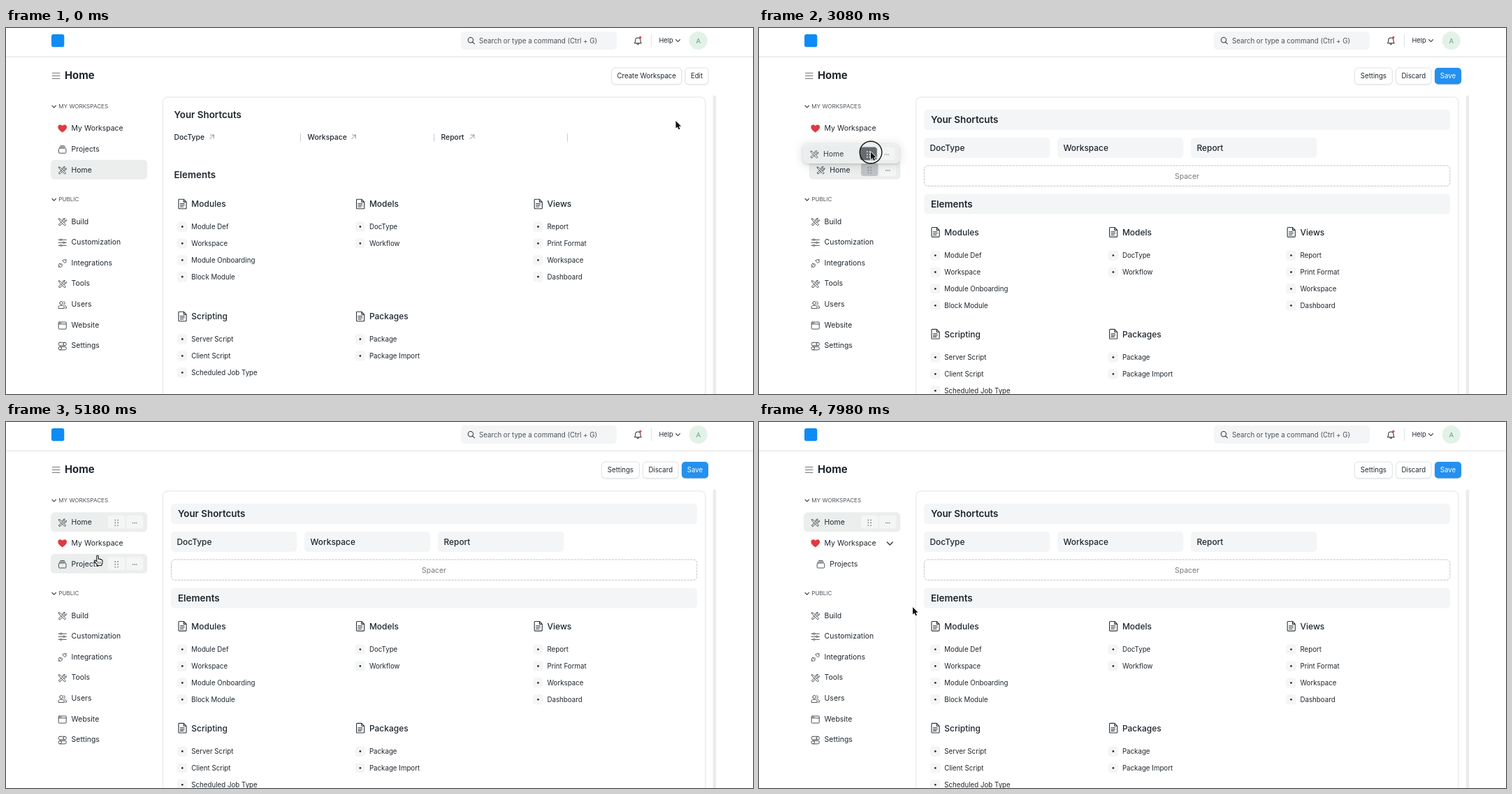
Recreate the animation shown at these times as an HTML page with a canvas. Size 1069 px wide and 524 px high, loop 8000 ms.

```html
<!DOCTYPE html>
<html lang="en">
<head>
<meta charset="utf-8">
<title>Workspace sidebar</title>
<style>
  html, body { margin: 0; width: 100%; height: 100%; overflow: hidden; background: #fff; }
  canvas { display: block; width: 1069px; height: 524px; }
</style>
</head>
<body>
<canvas id="stage"></canvas>
<script>
const W = 1069, H = 524, LOOP = 8000, STEP = 70;
const INK = '#1f272e', GREY = '#f4f5f6', ROW = '#ebeeed';
const EDIT_AT = 700;
const canvas = document.getElementById('stage');
const ctx = canvas.getContext('2d');
const dpr = window.devicePixelRatio || 1;
canvas.width = W * dpr;
canvas.height = H * dpr;

// Icons on a 16 unit grid
const icons = {
  tools: 'M1.8 2.2l2.6.8 8.8 8.8a1.3 1.3 0 0 1-2 2L2.6 5z M2.2 12l4-4M4.2 14l4-4M2.2 12a1.4 1.4 0 0 0 2 2M8.6 5.8a3.2 3.2 0 0 1 4-4l-1.8 2 .4 1.6 1.6.4 2-1.8a3.2 3.2 0 0 1-4 4',
  stack: 'M3 6h10a1.5 1.5 0 0 1 1.5 1.5v5.5a1.5 1.5 0 0 1-1.5 1.5h-10a1.5 1.5 0 0 1-1.5-1.5v-5.5a1.5 1.5 0 0 1 1.5-1.5zM3 3.8h10M4.6 1.6h6.8',
  sliders: 'M1 3h3M7 3h8M4 3a1.5 1.5 0 1 0 3 0a1.5 1.5 0 1 0-3 0M1 8h8M12 8h3M9 8a1.5 1.5 0 1 0 3 0a1.5 1.5 0 1 0-3 0M1 13h3M7 13h8M4 13a1.5 1.5 0 1 0 3 0a1.5 1.5 0 1 0-3 0',
  plug: 'M1 15l2.2-2.2M3.4 8.2l4.4 4.4-1.2 1.2a3 3 0 0 1-4.4-4.4zM5 9.6l1.6-1.6M7 11.2l1.6-1.6M8.2 3.4l4.4 4.4 1.2-1.2a3 3 0 0 0-4.4-4.4zM12.8 3.2l2.2-2.2',
  users: 'M3.2 5a2.8 2.8 0 1 0 5.6 0a2.8 2.8 0 1 0-5.6 0M1 14v-1.5c0-2 1.5-3 3-3h4c1.500 0 3 1 3 3v1.500zM10.500 2.400a2.700 2.700 0 0 1 0 5.200M12 9.500c2 .2 3 1.300 3 3v1.500h-2',
  window: 'M2.500 2h11a1.300 1.300 0 0 1 1.300 1.300v9.800a1.300 1.300 0 0 1-1.300 1.300h-11a1.300 1.300 0 0 1-1.300-1.300v-9.800a1.300 1.300 0 0 1 1.300-1.300zM1.200 5.600h13.600M3.300 3.900h.5M5.300 3.900h.5',
  toggles: 'M3.800 1.500h8.400a2.800 2.800 0 0 1 0 5.600h-8.400a2.800 2.800 0 0 1 0-5.600zM3.800 9h8.400a2.800 2.800 0 0 1 0 5.600h-8.400a2.800 2.800 0 0 1 0-5.600zM9.500 4.300a2.700 2.700 0 0 0 2.700 2.800M6.500 11.800a2.700 2.700 0 0 1-2.700 2.800M12.200 1.500a2.700 2.700 0 0 0-2.700 2.800M3.800 9a2.700 2.700 0 0 1 2.700 2.800',
  doc: 'M3.500 1h6.500l4 4v9a1 1 0 0 1-1 1h-9.500a1 1 0 0 1-1-1v-12a1 1 0 0 1 1-1zM10 1v4h4M5 7.500h6M5 9.800h6M5 12.100h4.500',
  bell: 'M2.500 12h11c-1-1-1.400-2-1.400-4.800a4.100 4.100 0 0 0-8.200 0c0 2.800-.4 3.800-1.400 4.800zM6.300 12.300a1.700 1.700 0 0 0 3.400 0',
  search: 'M2.500 7a4.700 4.700 0 1 0 9.400 0a4.700 4.700 0 1 0-9.400 0M10.600 10.400l3.600 3.600',
  arrow: 'M4 12l8-8M5.500 4h6.500v6.500'
};
for (const name in icons) icons[name] = new Path2D(icons[name]);
const heart = new Path2D('M8 14.800C4 12 .2 9 .2 5.200C.2 1 5.500 -.2 8 3.200C10.500 -.2 15.800 1 15.800 5.200C15.800 9 12 12 8 14.800z');
const pointer = new Path2D('M0 0V10.600L2.400 8.400L4.100 12.300L6 11.500L4.300 7.700H7.600Z');
const hand = new Path2D('M-1.200 .8Q0 -.8 1.200 .8V5.200Q2.500 4.600 3.200 5.600Q4.600 5 5.200 6.200Q6.800 5.800 7 7.500V10Q7 12 5.800 13V14.500H-.6V13.300Q-3 10.800 -4.600 8Q-4.400 6.400 -2.800 7.300L-1.200 8.800Z');

function text(str, x, y, size, { weight = 400, color = INK, align = 'left' } = {}) {
  ctx.font = `${weight} ${size}px Inter, sans-serif`;
  ctx.textAlign = align;
  ctx.fillStyle = color;
  ctx.fillText(str, x, y + size * 0.364);
}

function box(x, y, w, h, r, fill, stroke) {
  ctx.beginPath();
  ctx.roundRect(x, y, w, h, r);
  if (fill) { ctx.fillStyle = fill; ctx.fill(); }
  if (stroke) { ctx.strokeStyle = stroke; ctx.lineWidth = 1; ctx.stroke(); }
}

function disc(x, y, r, fill) {
  ctx.beginPath();
  ctx.arc(x, y, r, 0, Math.PI * 2);
  ctx.fillStyle = fill;
  ctx.fill();
}

function line(points, color, width) {
  ctx.beginPath();
  points.forEach(([x, y]) => ctx.lineTo(x, y));
  ctx.strokeStyle = color;
  ctx.lineWidth = width;
  ctx.stroke();
}

function chevron(x, y, s, color = '#333', width = 1.1) {
  line([[x - s, y - s / 2], [x, y + s / 2], [x + s, y - s / 2]], color, width);
}

function icon(name, x, y, size = 13, color = '#3f474e', width = 1.15) {
  ctx.save();
  ctx.translate(x - size / 2, y - size / 2);
  ctx.scale(size / 16, size / 16);
  if (name === 'heart') {
    ctx.fillStyle = '#e03a3e';
    ctx.fill(heart);
  } else {
    ctx.strokeStyle = color;
    ctx.lineWidth = width;
    ctx.stroke(icons[name]);
  }
  ctx.restore();
}

function button(label, x, w, primary) {
  ctx.save();
  ctx.shadowColor = 'rgba(0,0,0,.16)';
  ctx.shadowBlur = 2 * dpr;
  ctx.shadowOffsetY = 0.7 * dpr;
  box(x, 57, w, 23.5, 5, primary ? '#2490ef' : '#fff');
  ctx.restore();
  if (!primary) box(x, 57, w, 23.5, 5, null, '#e2e4e6');
  text(label, x + w / 2, 68.8, 9.65, { align: 'center', color: primary ? '#fff' : INK });
}

function header() {
  ctx.fillStyle = '#ededee';
  ctx.fillRect(0, 40.3, W, 2);
  box(65, 9, 18.3, 18.3, 3, '#0f8bf5');
  box(651, 5, 223, 26, 5.5, GREY);
  icon('search', 665.5, 18, 12.5, '#333', 1.3);
  text('Search or type a command (Ctrl + G)', 677, 18, 9.7, { color: '#4c5257' });
  icon('bell', 904.3, 18.2, 14, '#333', 1.2);
  disc(907.8, 13.4, 1.7, '#e24c4c');
  line([[923.5, 9], [923.5, 27]], '#e0e2e4', 1);
  text('Help', 934.5, 18, 9.25);
  chevron(961.5, 18.2, 3);
  disc(990.7, 18, 13, '#e3f2e8');
  text('A', 990.7, 18.2, 9.6, { color: '#5ba27a', align: 'center' });
  for (const y of [64.5, 68.5, 72.5]) line([[66, y], [77, y]], '#74797e', 1);
  text('Home', 84, 68, 14.9, { weight: 700 });
}

const COLUMN = 254.6;
const cards = [
  [0, 0, 'Modules', ['Module Def', 'Workspace', 'Module Onboarding', 'Block Module']],
  [1, 0, 'Models', ['DocType', 'Workflow']],
  [2, 0, 'Views', ['Report', 'Print Format', 'Workspace', 'Dashboard']],
  [0, 1, 'Scripting', ['Server Script', 'Client Script', 'Scheduled Job Type']],
  [1, 1, 'Packages', ['Package', 'Package Import']]
];

function drawCards(tops, gap) {
  for (const [col, row, title, items] of cards) {
    const x = 252.3 + col * COLUMN, y = tops[row];
    icon('doc', x, y, 15.5, '#2f363c', 1.15);
    text(title, x + 13, y, 12, { weight: 500 });
    items.forEach((item, i) => {
      const iy = y + gap + i * 23.9;
      box(x - 7.3, iy - 7.2, 14.4, 14.4, 4, GREY);
      disc(x, iy, 1.4, '#2b3238');
      text(item, x + 13, iy, 9.72);
    });
  }
}

const shortcuts = [['DocType', 294.5], ['Workspace', 497.5], ['Report', 667]];

function panel(editing) {
  ctx.save();
  ctx.shadowColor = 'rgba(0,0,0,.15)';
  ctx.shadowBlur = 3 * dpr;
  box(225, 99.3, 775.500, 460, 7, '#fff');
  ctx.restore();
  box(224.7, 99, 776, 460, 7, null, '#ebecec');
  box(1011.7, 96.500, 4.500, 440, 2, '#ebebeb');
  if (!editing) {
    button('Create Workspace', 866.7, 100);
    button('Edit', 972, 33);
    text('Your Shortcuts', 240.500, 124.500, 13.4, { weight: 600 });
    shortcuts.forEach(([name, ax], i) => {
      const x = 240.500 + i * 191;
      text(name, x, 156, 10.400, { weight: 500 });
      icon('arrow', ax, 156, 11.500, '#7c8288', 1.200);
      line([[x + 181, 151.500], [x + 181, 162]], '#c6cacd', 1);
    });
    text('Elements', 240.500, 210, 13.400, { weight: 600 });
    drawCards([252, 413], 32.500);
    return;
  }
  button('Settings', 852.500, 53.800);
  button('Discard', 911.500, 50.500);
  button('Save', 967, 38, true);
  [['Your Shortcuts', 117], ['Elements', 237.500]].forEach(([name, y]) => {
    box(236, y, 753, 29, 5, GREY);
    text(name, 246, y + 14.500, 13.400, { weight: 600 });
  });
  shortcuts.forEach(([name], i) => {
    const x = 236 + i * 191;
    box(x, 157, 180.300, 29, 5, GREY);
    text(name, x + 8.500, 171.800, 11.900, { weight: 500 });
  });
  ctx.setLineDash([2.600, 1.900]);
  box(236.500, 197, 752.300, 29.300, 5, null, '#c3c7ca');
  ctx.setLineDash([]);
  text('Spacer', 612.500, 212.500, 10.450, { color: '#74797e', align: 'center' });
  drawCards([292.300, 438.200], 33.300);
}

const slots = [143.300, 173, 202.800];
const publicRows = [
  ['Build', 'tools'], ['Customization', 'sliders'], ['Integrations', 'plug'], ['Tools', 'tools'],
  ['Users', 'users'], ['Website', 'window'], ['Settings', 'toggles']
];
const pages = { 'My Workspace': 'heart', Projects: 'stack', Home: 'tools' };
const tones = { light: '#f4f6f6', hover: '#bfc3c5', dark: '#54585c' };

function rowButtons(y, grip, more, dx = 0) {
  box(146 + dx, y - 9.500, 24.300, 18.700, 4, tones[grip]);
  box(172 + dx, y - 9.500, 24.300, 18.700, 4, tones[more]);
  const dots = grip === 'dark' ? '#fff' : '#858b90';
  for (let i = 0; i < 6; i++) {
    disc(156.300 + dx + (i % 2) * 3.800, y - 2.800 + Math.floor(i / 2) * 3.800, 0.950, dots);
  }
  for (let i = -1; i < 2; i++) disc(184.200 + dx + i * 2.500, y + 1.200, 0.650, '#444b51');
}

function label(name, kind, y, dx = 0) {
  icon(kind, 80.700 + dx, y + (kind === 'heart' ? 0.700 : 0.900), 13);
  text(name, 93.600 + dx, y, 10.450);
}

function section(name, y) {
  chevron(68.700, y + 0.500, 2.800);
  text(name, 75.300, y, 8.100, { color: '#4c5359' });
}

// Keyframes are [time, ...values], eased between neighbours
function sample(keys, t) {
  const next = keys.findIndex(k => k[0] > t);
  if (next < 0) return keys[keys.length - 1].slice(1);
  if (next === 0) return keys[0].slice(1);
  const a = keys[next - 1], b = keys[next];
  const p = (t - a[0]) / (b[0] - a[0]);
  const e = p * p * (3 - 2 * p);
  return a.slice(1).map((v, i) => v + (b[i + 1] - v) * e);
}

const cursorKeys = [
  [0, 958.500, 133], [350, 989, 68], [840, 989, 68], [1680, 175, 208], [1960, 181, 204],
  [2310, 158, 208], [2730, 158, 208], [3080, 160, 177.500], [3570, 160, 139.500], [3780, 160, 137],
  [4270, 160, 137], [4760, 146, 172], [5180, 131, 191], [5530, 124, 176], [5950, 117.500, 201],
  [6020, 117.500, 201], [6300, 132, 178], [6650, 158, 208], [6930, 158, 208], [7350, 160, 200],
  [7700, 160, 200], [7980, 220, 265]
];
const drags = [
  { page: 'Home', from: 2800, to: 4340, dx: -1.500,
    path: [[2730, 202.800], [3080, 180], [3570, 139.500], [3780, 137.300]] },
  { page: 'Projects', from: 7000, to: 7770, dx: 0, path: [[6930, 202.800], [7350, 195]] }
];

function pageOrder(t) {
  if (t < 3220) return ['My Workspace', 'Projects', 'Home'];
  if (t < 3640) return ['My Workspace', 'Home', 'Projects'];
  return ['Home', 'My Workspace', 'Projects'];
}

function indentOf(name, t) {
  const nested = name === 'Home' ? t >= 2940 && t < 3640 : name === 'Projects' && t >= 7070;
  return nested ? 7.700 : 0;
}

function sidebar(t, x, y, drag) {
  section('MY WORKSPACES', 112);
  section('PUBLIC', 245.300);
  pageOrder(t).forEach((name, i) => {
    const ry = slots[i], dx = indentOf(name, t);
    const held = drag && drag.page === name;
    const over = !drag && x > 64 && x < 202 && Math.abs(y - ry) < 14.800;
    const stuck = drag && drag.page === 'Home' && name === 'Projects' && t >= 3220;
    const active = name === 'Home' || over || stuck || held;
    if (active) box(64 + dx, ry - 14, 138.300 - dx, 28, 5.500, ROW);
    label(name, pages[name], ry, dx);
    if (active && t >= EDIT_AT) {
      const grip = stuck ? 'dark' : held || (over && x > 146 && x < 170) ? 'hover' : 'light';
      rowButtons(ry, grip, over && x >= 172 && x < 197 ? 'hover' : 'light');
    }
    if (name === 'My Workspace' && t >= 7770) chevron(187.300, ry + 1, 4, '#333', 1.300);
  });
  publicRows.forEach(([name, kind], i) => label(name, kind, 276.700 + i * 29.650));
}

function ghost(drag, t) {
  const [y] = sample(drag.path, t), x = 64 + drag.dx;
  ctx.save();
  ctx.globalAlpha = 0.88;
  ctx.shadowColor = 'rgba(0,0,0,.17)';
  ctx.shadowBlur = 15 * dpr;
  ctx.shadowOffsetY = 1 * dpr;
  box(x, y - 14, 138.300, 28, 5.500, '#f1f3f3');
  ctx.shadowBlur = 3 * dpr;
  box(x, y - 14, 138.300, 28, 5.500, '#f1f3f3');
  ctx.shadowColor = 'transparent';
  label(drag.page, pages[drag.page], y, drag.dx);
  rowButtons(y, 'dark', 'light', drag.dx);
  ctx.restore();
}

function cursor(t, x, y, drag) {
  const onButton = x > 967 && x < 1005 && y < 81;
  const onRow = x > 64 && x < 202 && y > 129 && y < 217;
  const useHand = !drag && (onButton || onRow);
  if (drag) {
    ctx.beginPath();
    ctx.arc(x, y + 0.500, 15.800, 0, Math.PI * 2);
    ctx.strokeStyle = '#161616';
    ctx.lineWidth = 1.400;
    ctx.stroke();
  }
  ctx.save();
  ctx.translate(x, y);
  if (useHand) {
    ctx.fillStyle = '#fff';
    ctx.fill(hand);
    ctx.strokeStyle = '#151515';
    ctx.lineWidth = 1.100;
    ctx.stroke(hand);
    for (const i of [0, 2, 4]) line([[i + 0.300, 9], [i + 0.300, 12]], '#333', 0.700);
  } else {
    ctx.strokeStyle = '#fff';
    ctx.lineWidth = 1.600;
    ctx.stroke(pointer);
    ctx.fillStyle = '#111';
    ctx.fill(pointer);
  }
  ctx.restore();
}

function draw(now) {
  const t = Math.floor((now % LOOP) / STEP) * STEP;
  const [x, y] = sample(cursorKeys, t);
  const drag = drags.find(d => t >= d.from && t < d.to);
  ctx.setTransform(dpr, 0, 0, dpr, 0, 0);
  ctx.lineCap = ctx.lineJoin = 'round';
  ctx.fillStyle = '#fff';
  ctx.fillRect(0, 0, W, H);
  header();
  panel(t >= EDIT_AT);
  sidebar(t, x, y, drag);
  if (drag) ghost(drag, t);
  cursor(t, x, y, drag);
}

const start = performance.now();
function tick() {
  draw(performance.now() - start);
  requestAnimationFrame(tick);
}
tick();
</script>
</body>
</html>
```
